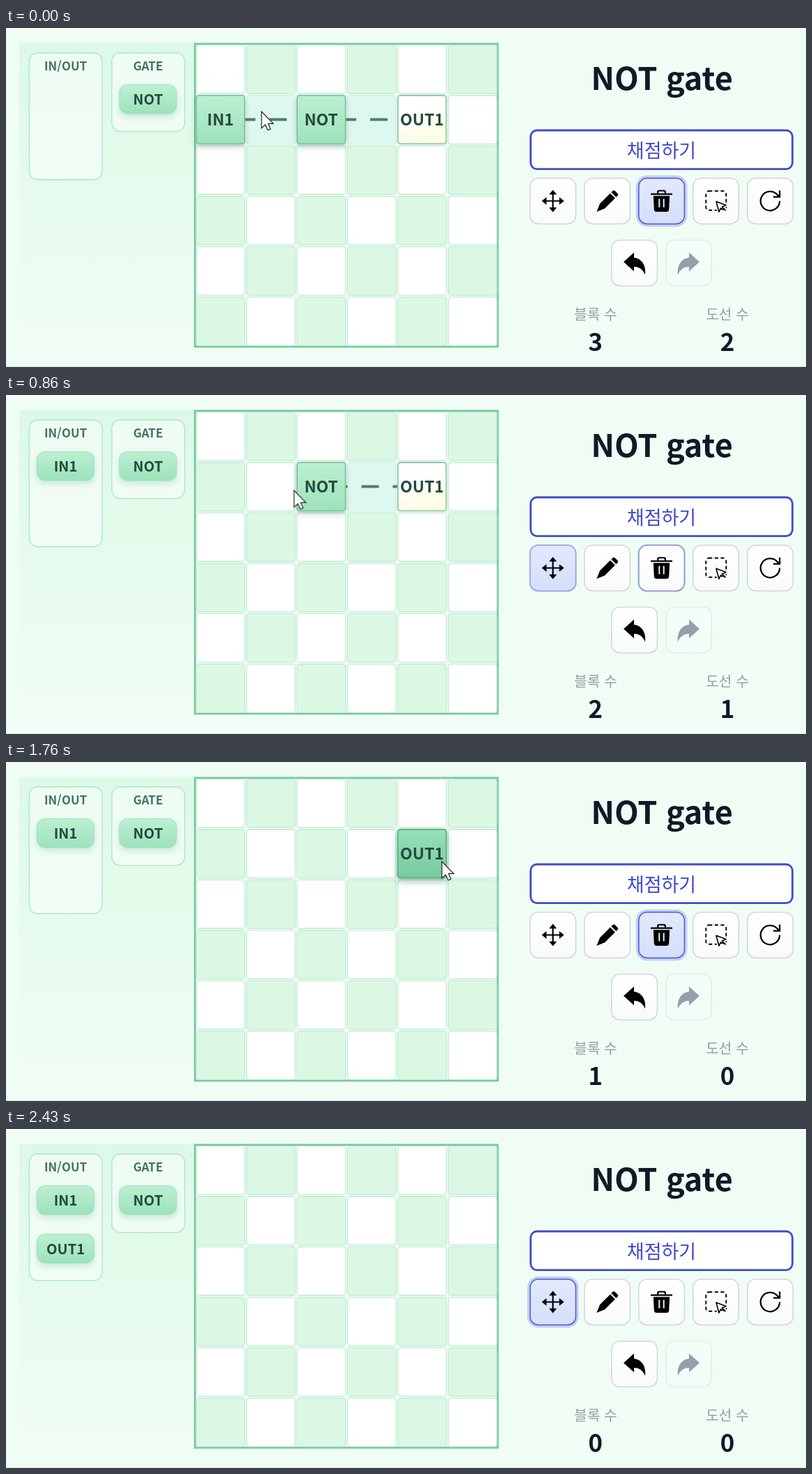
An HTML page for the animation above (2690 ms loop, 1149 by 487 pixels).

```html
<!DOCTYPE html>
<html lang="ko">
<head>
<meta charset="utf-8">
<title>NOT gate</title>
<style>
html, body { margin: 0; width: 100%; height: 100%; overflow: hidden; background: #f0fdf4; }
svg { display: block; width: 100vw; height: 100vh; }
text { font-family: "Noto Sans CJK KR", "Noto Sans KR", "Noto Sans CJK JP", sans-serif; font-weight: 700; text-anchor: middle; }
.title { font-size: 45px; fill: #111827; }
.head { font-size: 17px; fill: #447263; }
.chip text { font-size: 20.3px; fill: #25493e; }
.label { font-size: 23px; fill: #25493e; }
.grade { font-size: 27px; font-weight: 400; fill: #3f48cc; }
.stat { font-size: 20.3px; font-weight: 400; fill: #8f9ea8; }
.num text { font-size: 35px; fill: #111827; }
.panel { fill: #fff; fill-opacity: .5; stroke: #ace5cf; stroke-width: 1.4; }
.chip use { filter: drop-shadow(0 4px 4px rgba(30, 150, 110, .2)); }
.block { filter: drop-shadow(0 5px 4px rgba(30, 80, 60, .2)); }
.hot { fill: url(#hotFill); stroke: #62b089; filter: drop-shadow(0 5px 6px rgba(40, 130, 140, .22)); }
.wire { stroke: #4f7d6d; stroke-width: 4; stroke-dasharray: 25 20; }
.line { fill: none; stroke: #000; stroke-width: 2.2; }
.ring { fill: none; stroke: #c3cff4; stroke-width: 8; }
.edge { fill: none; stroke: #4a57d0; stroke-width: 1.5; }

/* one loop = 2690 ms; a, b, c are the three deletions */
[class*="until-"], [class*="from-"], .trash-bg, .move-bg { animation: 2690ms step-end infinite; }
.until-a { animation-name: untilA; }
.from-a { animation-name: fromA; }
.until-b { animation-name: untilB; }
.from-b { animation-name: fromB; }
.until-c { animation-name: untilC; }
.from-c { animation-name: fromC; }
.trash-bg { animation-name: trashBg; }
.move-bg { animation-name: moveBg; }
@keyframes untilA { 0% { opacity: 1 } 11.15%, 100% { opacity: 0 } }
@keyframes fromA { 0% { opacity: 0 } 11.15%, 100% { opacity: 1 } }
@keyframes untilB { 0% { opacity: 1 } 44.61%, 100% { opacity: 0 } }
@keyframes fromB { 0% { opacity: 0 } 44.61%, 100% { opacity: 1 } }
@keyframes untilC { 0% { opacity: 1 } 70.63%, 100% { opacity: 0 } }
@keyframes fromC { 0% { opacity: 0 } 70.63%, 100% { opacity: 1 } }
@keyframes trashBg { 0%, 39.59% { opacity: 1 } 30.48%, 84.2%, 100% { opacity: 0 } }
@keyframes moveBg { 0%, 39.59% { opacity: 0 } 30.48%, 84.2%, 100% { opacity: 1 } }

.trash-on, .move-on, .hot { animation: 2690ms ease infinite; }
.trash-on { animation-name: trashOn; }
.move-on { animation-name: moveOn; }
@keyframes trashOn {
  0%, 30.48%, 45.17%, 84.2% { opacity: 1 }
  36.06%, 39.59%, 89.78%, 100% { opacity: 0 }
}
@keyframes moveOn {
  0%, 30.48%, 45.17%, 84.2% { opacity: 0 }
  36.06%, 39.59%, 89.78%, 100% { opacity: 1 }
}
.trash-on .ring { animation: trashRing 2690ms ease infinite; }
.move-on .ring { animation: moveRing 2690ms ease infinite; }
@keyframes trashRing {
  0%, 30.48%, 45.17%, 84.2% { stroke-width: 8px }
  36.06%, 39.59%, 89.78%, 100% { stroke-width: 0 }
}
@keyframes moveRing {
  0%, 30.48%, 45.17%, 84.2% { stroke-width: 0 }
  36.06%, 39.59%, 89.78%, 100% { stroke-width: 8px }
}

.hot.h-in { animation-name: hotIn; }
.hot.h-not { animation-name: hotNot; }
.hot.h-out { animation-name: hotOut; }
@keyframes hotIn { 0%, 2.6% { opacity: 0 } 8.18%, 100% { opacity: 1 } }
@keyframes hotNot { 0%, 32.34% { opacity: 0 } 37.92%, 100% { opacity: 1 } }
@keyframes hotOut { 0%, 55.02% { opacity: 0 } 59.48%, 100% { opacity: 1 } }

.wire { animation: flow 2690ms linear infinite; }
@keyframes flow { from { stroke-dashoffset: -25.3px } to { stroke-dashoffset: -267.4px } }

#cursor { animation: roam 2690ms linear infinite; }
@keyframes roam {
  0% { transform: translate(367px, 120px) }
  2.23% { transform: translate(347px, 126px) }
  5.58% { transform: translate(324px, 136px) }
  9.67% { transform: translate(318px, 140px) }
  15.99% { transform: translate(319px, 141px) }
  20.45% { transform: translate(339px, 141px) }
  23.79% { transform: translate(350px, 141px) }
  28.25% { transform: translate(376px, 139px) }
  32.34% { transform: translate(417px, 137px) }
  36.43% { transform: translate(442px, 135px) }
  41.26% { transform: translate(444px, 135px) }
  48.33% { transform: translate(446px, 136px) }
  52.04% { transform: translate(490px, 137px) }
  54.28% { transform: translate(556px, 138px) }
  55.76% { transform: translate(613px, 140px) }
  59.11%, 67.66% { transform: translate(626px, 143px) }
  72.86% { transform: translate(632px, 147px) }
  78.07% { transform: translate(700px, 190px) }
  80.67% { transform: translate(800px, 255px) }
  82.53% { transform: translate(960px, 360px) }
  83.64%, 84.7% { transform: translate(1133px, 466px) }
  84.75%, 100% { transform: translate(1250px, 540px) }
}
</style>
</head>
<body>
<svg viewBox="0 0 1149 487">
  <defs>
    <linearGradient id="sideFill" x2="0" y2="1"><stop stop-color="#dcf9e6"/><stop offset="1" stop-color="#f0fdf4"/></linearGradient>
    <linearGradient id="mint" x2="0" y2="1"><stop stop-color="#bcf0d2"/><stop offset="1" stop-color="#9ce2ba"/></linearGradient>
    <linearGradient id="hotFill" x2="0" y2="1"><stop stop-color="#98e1b8"/><stop offset="1" stop-color="#76cc9d"/></linearGradient>
    <linearGradient id="cream" x2=".3" y2="1"><stop offset=".4" stop-color="#fff"/><stop offset="1" stop-color="#fdfde6"/></linearGradient>
    <linearGradient id="btnFill" x2="0" y2="1"><stop stop-color="#fff"/><stop offset="1" stop-color="#f9fafb"/></linearGradient>
    <linearGradient id="onFill" x2="0" y2="1"><stop stop-color="#e2e9fe"/><stop offset="1" stop-color="#d5defb"/></linearGradient>
    <rect id="chip" x="44.5" y="81.5" width="82" height="41.5" rx="12" fill="url(#mint)" stroke="#a2e2cb" stroke-width="1.2"/>
    <rect id="tile" width="69.4" height="69.4" rx="3.5" stroke-width="1.8"/>
    <rect id="btn" x="752.8" y="215.8" width="65.6" height="65.6" rx="12"/>
    <path id="bend" d="M887 336L902 322.5V330C913 331 919.5 341 918 354.5C914 346 909 343 902 343V349.5Z"/>
  </defs>

  <rect width="1149" height="487" fill="#f0fdf4"/>
  <rect y="486" width="1149" height="1" fill="#dfe7e4"/>
  <rect x="19" y="21.5" width="252" height="437" fill="url(#sideFill)"/>

  <!-- palette -->
  <rect class="panel" x="33.5" y="35.8" width="104.6" height="182" rx="12"/>
  <rect class="panel" x="152" y="35.8" width="104.6" height="112.8" rx="12"/>
  <text class="head" x="85.7" y="61.3">IN/OUT</text>
  <text class="head" x="204" y="61.3">GATE</text>
  <g class="chip" transform="translate(118.4 0)"><use href="#chip"/><text x="85.6" y="110">NOT</text></g>
  <g class="from-a"><g class="chip"><use href="#chip"/><text x="85.6" y="110">IN1</text></g></g>
  <g class="from-c"><g class="chip" transform="translate(0 69.7)"><use href="#chip"/><text x="85.6" y="110">OUT1</text></g></g>

  <!-- board -->
  <rect x="271.4" y="22.8" width="434.8" height="435" fill="#f0fdf4" stroke="#78c8a0" stroke-width="2.8"/>
  <g id="cells" stroke="#bfecd1" stroke-width="1.3"></g>
  <g class="until-a">
    <rect x="345.7" y="97" width="69.6" height="69.6" rx="4" fill="#ddf8f1" stroke="#d3f4ea"/>
    <line class="wire" x1="307.9" y1="131.5" x2="452.7" y2="131.5"/>
  </g>
  <g class="until-b">
    <rect x="490.5" y="97" width="69.6" height="69.6" rx="4" fill="#ddf8f1" stroke="#d3f4ea"/>
    <line class="wire" x1="452.7" y1="131.5" x2="597.5" y2="131.5"/>
  </g>

  <g class="until-a">
    <use class="block" href="#tile" x="273.3" y="96.9" fill="url(#mint)" stroke="#7fc3a0"/>
    <use class="hot h-in" href="#tile" x="273.3" y="96.9"/>
    <text class="label" x="308" y="140">IN1</text>
  </g>
  <g class="until-b">
    <use class="block" href="#tile" x="418.1" y="96.9" fill="url(#mint)" stroke="#7fc3a0"/>
    <use class="hot h-not" href="#tile" x="418.1" y="96.9"/>
    <text class="label" x="452.7" y="140">NOT</text>
  </g>
  <g class="until-c">
    <use class="until-b" href="#tile" x="562.8" y="96.9" fill="url(#cream)" stroke="#94c5a6"/>
    <g class="from-b">
      <use class="block" href="#tile" x="562.8" y="96.9" fill="url(#mint)" stroke="#7fc3a0"/>
      <use class="hot h-out" href="#tile" x="562.8" y="96.9"/>
    </g>
    <text class="label" x="597.5" y="140">OUT1</text>
  </g>

  <!-- controls -->
  <text class="title" x="942" y="89">NOT gate</text>
  <rect x="753.5" y="147" width="376" height="55.6" rx="9" fill="#fff" stroke="#434bcb" stroke-width="2.8"/>
  <text class="grade" x="941.5" y="186.3">채점하기</text>

  <g class="move-on"><use class="ring" href="#btn"/></g>
  <g class="trash-on"><use class="ring" href="#btn" x="156"/></g>
  <g fill="url(#btnFill)" stroke="#d1d5db" stroke-width="1.5">
    <use href="#btn"/><use href="#btn" x="78"/><use href="#btn" x="156"/>
    <use href="#btn" x="234"/><use href="#btn" x="312"/><use href="#btn" x="117" y="89"/>
    <use href="#btn" x="195" y="89" opacity=".4"/>
  </g>
  <use class="move-bg" href="#btn" fill="url(#onFill)"/>
  <use class="trash-bg" href="#btn" x="156" fill="url(#onFill)"/>
  <g class="move-on"><use class="edge" href="#btn"/></g>
  <g class="trash-on"><use class="edge" href="#btn" x="156"/></g>

  <!-- icons -->
  <path class="line" d="M774 248.5H797M785.5 237V260"/>
  <path d="M785.5 232.5L791 239.3H780ZM785.5 264.5L791 257.7H780ZM769.5 248.5L776.3 243V254ZM801.5 248.5L794.7 243V254Z"/>
  <path d="M869.3 236L872 233.6Q873.2 232.8 874.4 233.8L878.7 238.1Q879.7 239.3 878.8 240.5L876.3 243ZM867.8 237.5L874.8 244.5L860 259.3L848.3 264L853 252.3Z"/>
  <path d="M926 237.5H935V236Q935 232.8 938.2 232.8H944.8Q948 232.8 948 236V237.5H957V239.7H926ZM937.2 237.5H945.8V236.2Q945.8 234.8 944.4 234.8H938.6Q937.2 234.8 937.2 236.2ZM929.8 241.2H953.2L952.2 260.5Q952 264 948.5 264H934.5Q931 264 930.8 260.5Z" fill-rule="evenodd"/>
  <path d="M938.3 245.5V257.5M944.7 245.5V257.5" stroke="#e9edfc" stroke-width="2"/>
  <rect class="line" x="1005.3" y="234.3" width="29" height="27.5" rx="4" stroke-dasharray="5 3.6" style="stroke-width:1.9"/>
  <path class="line" d="M1020 249.3L1034 254.6L1028.4 257L1033.3 261.8L1031.2 263.8L1026.4 259L1024 264.2Z" fill="#fcfcfd" style="fill:#fcfcfd;stroke:#fcfcfd;stroke-width:5"/>
  <path class="line" d="M1020 249.3L1034 254.6L1028.4 257L1033.3 261.8L1026.4 259L1024 264.2Z" style="stroke-width:1.6" stroke-linejoin="round"/>
  <path class="line" d="M1111.2 248.5A13.7 13.7 0 1 1 1107.6 239.3L1110.8 242.4M1111.2 233.5V242.6H1102" style="stroke-width:2.3"/>
  <use href="#bend"/>
  <use href="#bend" transform="matrix(-1 0 0 1 1883 0)" fill="#959eaa"/>

  <!-- counters -->
  <text class="stat" x="846.8" y="418.8">블록 수</text>
  <text class="stat" x="1036" y="418.8">도선 수</text>
  <g class="num">
    <text class="until-a" x="846.5" y="463.5">3</text>
    <g class="from-a"><text class="until-b" x="846.5" y="463.5">2</text></g>
    <g class="from-b"><text class="until-c" x="846.5" y="463.5">1</text></g>
    <text class="from-c" x="846.5" y="463.5">0</text>
    <text class="until-a" x="1036" y="463.5">2</text>
    <g class="from-a"><text class="until-b" x="1036" y="463.5">1</text></g>
    <text class="from-b" x="1036" y="463.5">0</text>
  </g>

  <path id="cursor" d="M0 0V24L5.5 19L9 26.8L13 25.2L9.6 17.4H17Z" fill="#fff" stroke="#222" stroke-width="1.2"/>
</svg>
<script>
const cells = document.getElementById("cells");
const pitch = 72.4;
for (let i = 0; i < 36; i++) {
  const col = i % 6, row = Math.floor(i / 6);
  const cell = document.createElementNS("http://www.w3.org/2000/svg", "rect");
  const attrs = {
    x: 273.3 + col * pitch, y: 24.6 + row * pitch, width: 69.6, height: 69.6, rx: 4,
    fill: (col + row) % 2 ? "#dcf8e5" : "#fff"
  };
  for (const key in attrs) cell.setAttribute(key, attrs[key]);
  cells.append(cell);
}
</script>
</body>
</html>
```
